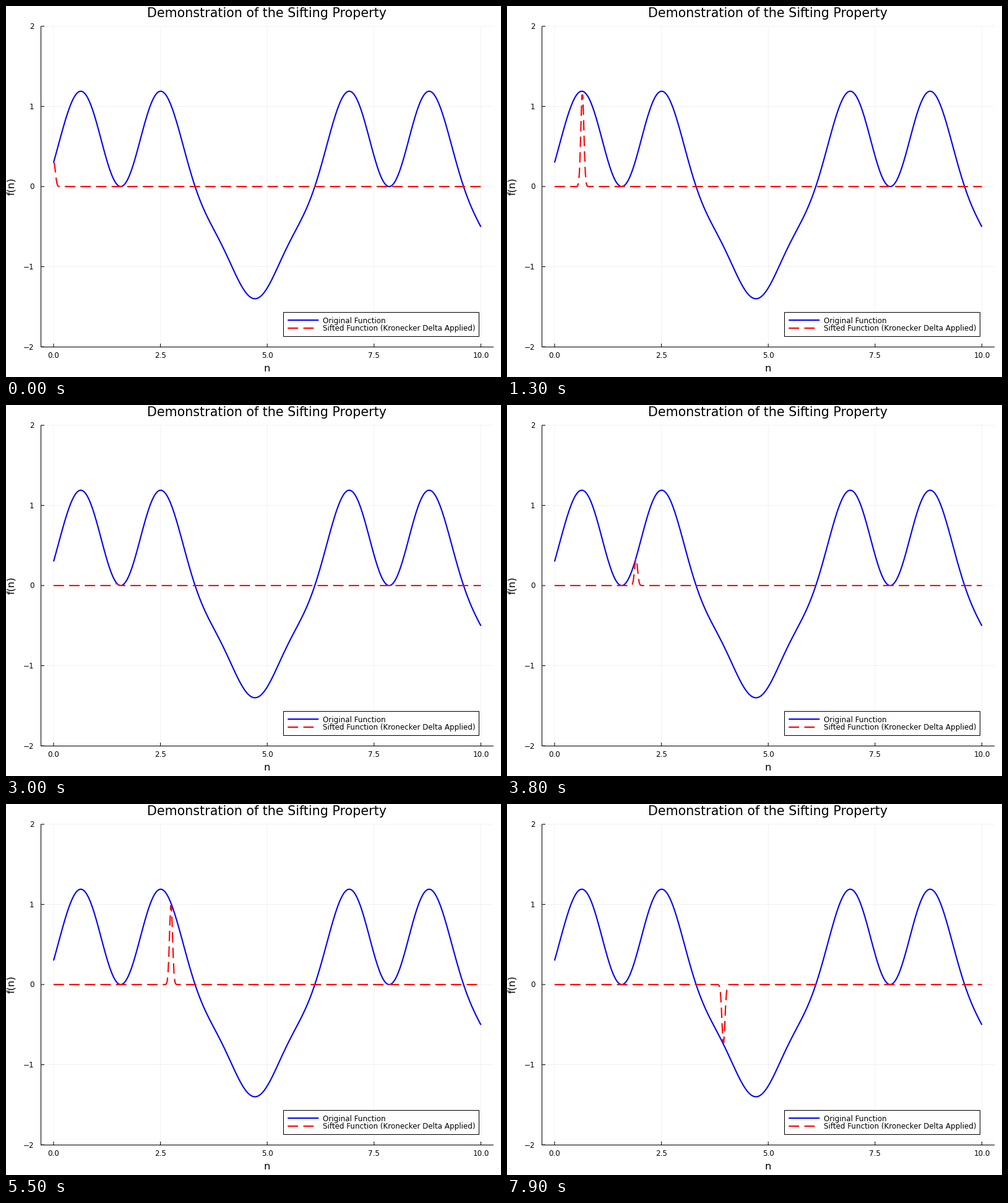
These frames come from a looping animation (800 px wide and 600 px high, 8 s). A matplotlib script:

```python
import matplotlib.pyplot as plt
import numpy as np
from matplotlib.animation import FuncAnimation
from matplotlib.patches import Rectangle

plt.rcParams.update({"font.family": "DejaVu Sans", "path.simplify": False})

W, H, DPI = 800, 600, 100
FRAMES, INTERVAL = 80, 100
STEP = 0.05      # pulse shift per frame
WIDTH = 0.05     # pulse width
X0, Y0, UX, UY = 76.9, 292.0, 69.06, 129.6
LEFT, RIGHT, TOP, BOTTOM = 56.5, 788, 32.8, 551.5
PT = 72 / DPI    # points per pixel
LW = 2.1 * PT
DASH = (0, (8, 4))


def px(x):
    return X0 + UX * x


def py(y):
    return Y0 - UY * y


def signal(t):
    return np.sin(t) + 0.5 * np.cos(2 * t) + 0.3 * np.sin(3 * t) - 0.2 * np.cos(4 * t)


def sifted(center):
    return signal(t) * np.exp(-((t - center) / WIDTH) ** 2)


fig = plt.figure(figsize=(W / DPI, H / DPI), dpi=DPI, facecolor="white")
ax = fig.add_axes([0, 0, 1, 1])
ax.set_xlim(0, W)
ax.set_ylim(H, 0)
ax.axis("off")


def line(x, y, color="black", lw=1.04 * PT, **kw):
    kw = {"solid_capstyle": "butt", "dash_capstyle": "butt",
          "solid_joinstyle": "round", "dash_joinstyle": "round",
          "snap": False, **kw}
    return ax.plot(x, y, color=color, lw=lw, **kw)[0]


def text(x, y, s, size, ha="center", va="baseline", **kw):
    ax.text(x, y, s, fontsize=size * PT, ha=ha, va=va, **kw)


# Grid, ticks and tick labels
for v in (0, 2.5, 5, 7.5, 10):
    x = px(v)
    line([x, x], [TOP, BOTTOM], alpha=0.1, lw=0.52 * PT)
    line([x, x], [BOTTOM, BOTTOM - 5.5])
    text(x, 569, f"{v:.1f}", 11.84)
for v in range(-2, 3):
    y = py(v)
    line([LEFT, RIGHT], [y, y], alpha=0.1, lw=0.52 * PT)
    line([LEFT, LEFT + 5.5], [y, y])
    text(45.5, y + 4.4, str(v).replace("-", "\u2212"), 11.84, ha="right")
line([LEFT, LEFT, RIGHT], [TOP, BOTTOM, BOTTOM])

# Titles
text(421, 18, "Demonstration of the Sifting Property", 20.7)
text(422, 591, "n", 16.3)
text(13.5, 292, "f(n)", 16.3, ha="right", va="center", rotation=90,
     rotation_mode="default") if False else text(
    8.7, 292, "f(n)", 16.3, va="center", rotation=90)

# Curves
t = np.linspace(0, 10, 501)
line(px(t), py(signal(t)), "blue", LW)
pulse = line(px(t), py(sifted(0)), "red", LW, ls=DASH)

# Legend
ax.add_patch(Rectangle((447.5, 495), 316, 39, fc="white", ec="black",
                       lw=1.04 * PT, zorder=3))
for y, color, ls, label in (
    (508, "blue", "-", "Original Function"),
    (521, "red", DASH, "Sifted Function (Kronecker Delta Applied)"),
):
    line([455.3, 505.3], [y, y], color, LW, ls=ls, zorder=4)
    text(511.7, y + 4.5, label, 11.84, ha="left", zorder=4)


def update(i):
    pulse.set_ydata(py(sifted(i * STEP)))
    return (pulse,)


anim = FuncAnimation(fig, update, frames=FRAMES, interval=INTERVAL,
                     repeat=True, repeat_delay=0)
plt.show()
```
